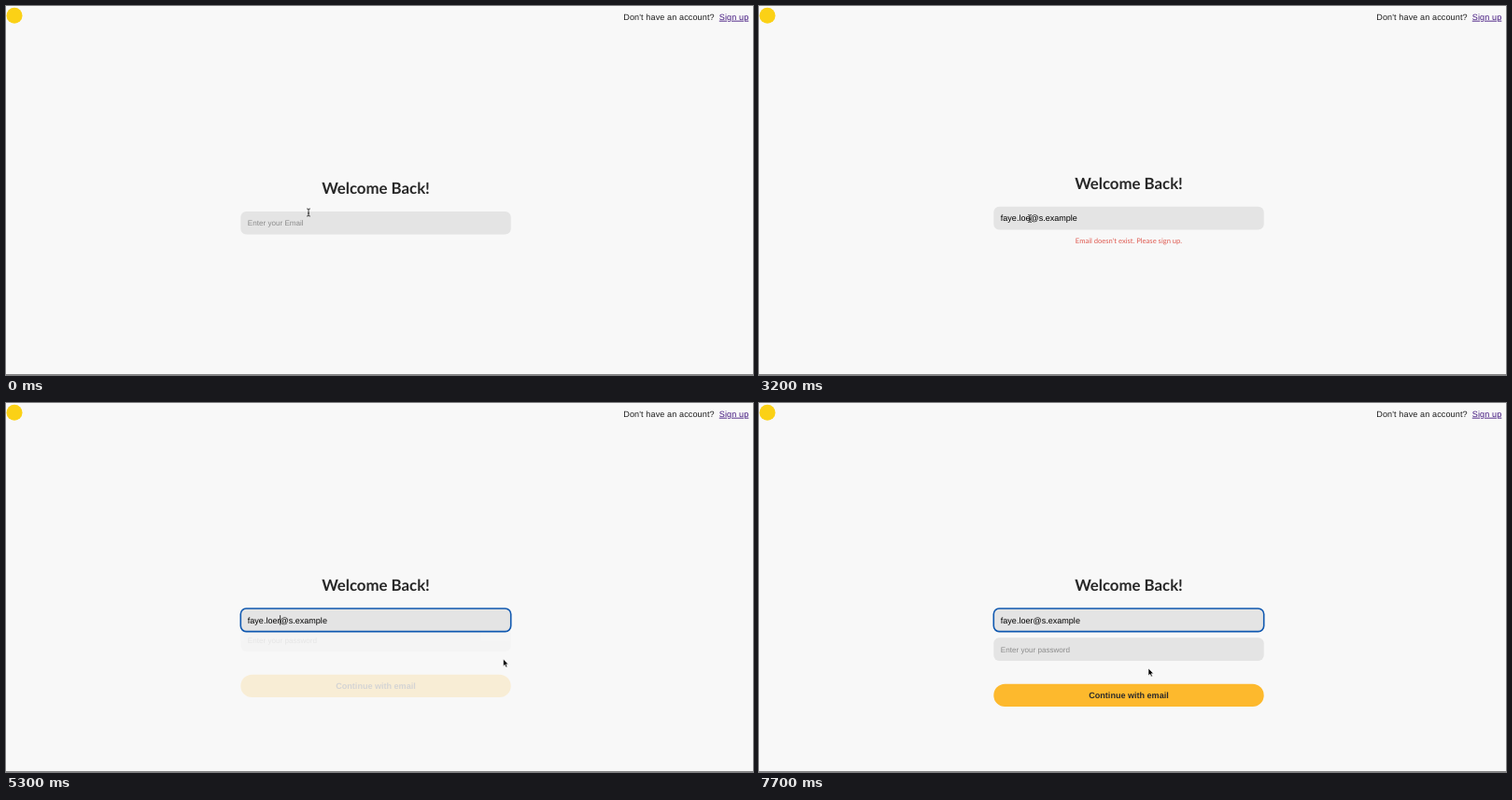
These frames come from a looping animation (800x395 px, 7.8 s). An HTML page:

```html
<!DOCTYPE html>
<html lang="en">
<head>
<meta charset="utf-8">
<title>Login</title>
<style>
  html, body { margin: 0; width: 100%; height: 100%; overflow: hidden; background: #f8f8f8; }
  svg { display: block; width: 800px; height: 395px; }
  text { font-family: "Liberation Sans", Arial, sans-serif; font-size: 9.05px; text-rendering: geometricPrecision; }
  .title { font: 700 16.8px Lato, sans-serif; fill: #272727; text-anchor: middle; }
  .error { font: 400 7.6px Lato, sans-serif; fill: #df5a50; text-anchor: middle; }
  .nav { letter-spacing: .12px; fill: #1c1c1c; }
  .link { fill: #451a80; text-decoration: underline; }
  .hint { font-size: 8.1px; fill: #8b8b8b; }
  .field { fill: #e4e4e4; }
  .ring { fill: none; stroke: #0f58b0; stroke-width: 1.6; }
  .button { fill: #fdb92d; }
  .label { font-weight: 700; fill: #2a2a2a; text-anchor: middle; }
</style>
</head>
<body>
<svg viewBox="0 0 800 395">
  <rect y="394" width="800" height="1" fill="#858585"/>
  <circle cx="9" cy="10.3" r="8.5" fill="#fbd116"/>
  <text class="nav" x="661.3" y="14.7">Don't have an account?</text>
  <text class="nav link" x="763.8" y="14.7">Sign up</text>

  <g id="form">
    <rect class="field" x="251.3" y="251.3" width="289.4" height="24.6" rx="6"/>
    <text class="hint" x="258.8" y="266.8">Enter your password</text>
    <rect class="button" x="251.3" y="300.8" width="289.4" height="24.2" rx="12.1"/>
    <text class="label" x="396" y="315.9">Continue with email</text>
  </g>

  <g id="head">
    <text class="title" x="396" y="201.3">Welcome Back!</text>
    <rect class="field" x="251.3" y="220" width="289.4" height="24.6" rx="6"/>
    <rect class="ring" id="ring" x="251.3" y="220" width="289.4" height="24.6" rx="6"/>
    <text class="hint" id="hint" x="258.8" y="235.3">Enter your Email</text>
    <text id="email" x="258.8" y="235.5"></text>
    <rect id="caret" y="227.2" width=".8" height="10.4"/>
  </g>
  <text class="error" id="error" x="396" y="253.9">Email doesn't exist. Please sign up.</text>

  <g id="mouse">
    <path id="arrow" d="M0 0V7.8L1.8 6.2L3 9L4.4 8.4L3.2 5.7H5.5Z" stroke="#fff" stroke-width=".6"/>
    <path id="beam" d="M-1.8 -4Q0 -4 0 -3V3Q0 4 -1.8 4M1.8 -4Q0 -4 0 -3M1.8 4Q0 4 0 3M-.9 .9H.9" fill="none" stroke="#222" stroke-width=".9"/>
  </g>
</svg>
<script>
  const LOOP = 7800, STEP = 100, BLINK = 500;
  const FOCUS = 600, FILL = 1300, FAIL = 1700, REFOCUS = 3400, FIX = 4200, OPEN = 5200;
  const $ = id => document.getElementById(id);

  const within = (t, a, b) => t >= a && t < b;
  const progress = (t, start, end) => Math.min(1, Math.max(0, (t - start) / (end - start)));
  const easeOut = k => k * (2 - k);
  const show = (id, on) => $(id).setAttribute("visibility", on ? "visible" : "hidden");
  const shift = (id, x, y) => $(id).setAttribute("transform", `translate(${x} ${y})`);

  // Each move slows down towards its end point.
  function pointerAt(t) {
    let px = 324, py = 221;
    const go = (start, end, x, y) => {
      const k = easeOut(progress(t, start, end));
      px += (x - px) * k;
      py += (y - py) * k;
    };
    go(200, FOCUS, 310, 232);
    go(FILL, 1800, 363, 288);
    go(2100, 3200, 290, 227.5);
    go(FIX, 5100, 526, 255);
    go(5100, 5300, 532.5, 274);
    go(5700, 6000, 466, 279);
    go(6100, 6800, 414, 306);
    go(7000, 7300, 417, 284);
    return [px, py];
  }

  function draw(t) {
    const filled = t >= FILL, fixed = t >= FIX;
    const failed = within(t, FAIL, OPEN);
    const focused = within(t, FOCUS, FAIL) || t >= REFOCUS;
    const lastInput = fixed ? FIX : t >= REFOCUS ? REFOCUS : FOCUS;
    const caretOn = Math.floor((t - lastInput) / BLINK) % 2 === 0;
    const isArrow = within(t, 1500, 3000) || t >= OPEN;
    const opened = progress(t, OPEN + 40, OPEN + 400);

    $("email").textContent = filled ? `faye.loe${fixed ? "r" : ""}@s.example` : "";
    show("hint", !filled);
    show("error", failed);
    show("ring", focused);
    show("caret", focused && caretOn);
    $("caret").setAttribute("x", fixed ? 293.3 : filled ? 290.3 : 258.6);
    shift("head", 0, failed ? -5.2 : 0);

    $("form").setAttribute("opacity", opened);
    shift("form", 0, -12 * (1 - opened));

    shift("mouse", ...pointerAt(t));
    show("arrow", isArrow);
    show("beam", !isArrow);
  }

  function tick() {
    draw(Math.floor(performance.now() % LOOP / STEP) * STEP);
    requestAnimationFrame(tick);
  }
  tick();
</script>
</body>
</html>
```
